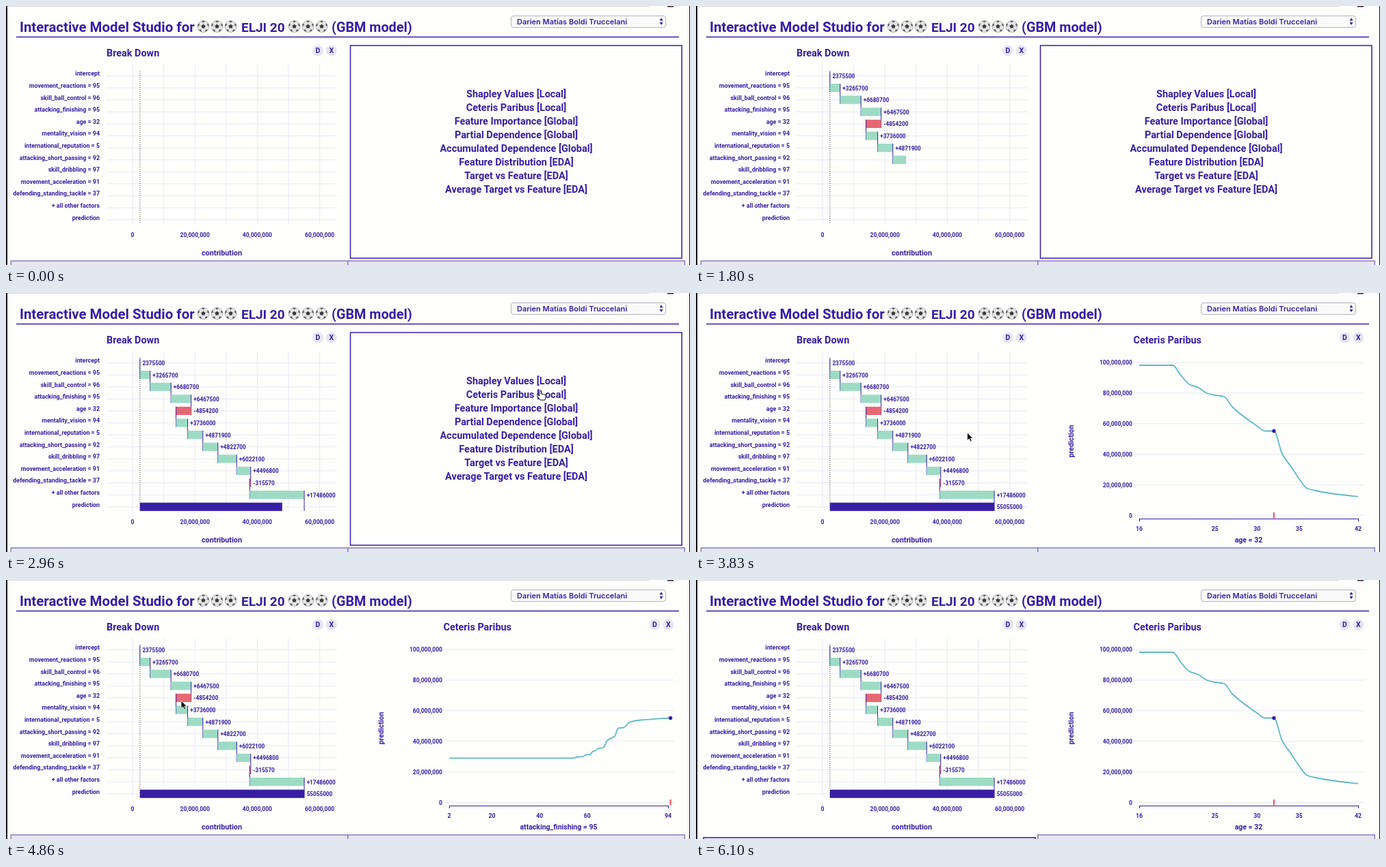
Write an HTML page that moves like this. It is 1000 by 380 pixels and loops after 8000 ms.

```html
<!DOCTYPE html>
<html lang="en">
<head>
<meta charset="utf-8">
<title>Interactive Model Studio</title>
<style>
  html, body { margin: 0; width: 100%; height: 100%; overflow: hidden; background: #fefefd; }
  svg { display: block; width: 1000px; height: 380px; font-family: Roboto, "Noto Sans", sans-serif; font-weight: 700; }
  text { fill: #371ea3; white-space: pre; }
</style>
</head>
<body>
<svg id="stage" viewBox="0 0 1000 380"></svg>
<script>
const LOOP = 8000;
const INK = '#371ea3', GREEN = '#9edbc5', RED = '#e66874', TEAL = '#5fb9c1', GRID = '#e9e9f1';
const BARS_START = 246, BAR_TIME = 232.5, DRAW_TIME = 235;

const stage = document.getElementById('stage');

function el(parent, tag, attrs = {}, content) {
  const node = document.createElementNS('http://www.w3.org/2000/svg', tag);
  set(node, attrs);
  if (content !== undefined) node.textContent = content;
  return parent.appendChild(node);
}
function set(node, attrs) {
  for (const key in attrs) node.setAttribute(key, attrs[key]);
}
const show = (node, on) => node.setAttribute('visibility', on ? 'visible' : 'hidden');
const group = (parent = stage) => el(parent, 'g');
const label = (parent, x, y, size, content, anchor = 'start') =>
  el(parent, 'text', { x, y, 'font-size': size, 'text-anchor': anchor }, content);
const line = (parent, x1, y1, x2, y2, stroke, width = 1) =>
  el(parent, 'line', { x1, y1, x2, y2, stroke, 'stroke-width': width });
const box = (parent, x, y, width, height, fill, more = {}) =>
  el(parent, 'rect', { x, y, width, height, fill, ...more });

const clamp = v => Math.max(0, Math.min(1, v));
const cubicInOut = p => p < 0.5 ? 4 * p ** 3 : 1 - 4 * (1 - p) ** 3;

// Page frame and header
box(stage, 0, 0, 1000, 380, '#fefefd');
box(stage, 0, 0, 940, 1, '#d9d9d9');
box(stage, 967, 0, 9, 1.5, '#3b1f33');
box(stage, 0, 0, 2, 380, '#111');
box(stage, 999, 0, 1, 380, '#111');

function ball(cx, cy) {
  const g = el(stage, 'g', { transform: `translate(${cx} ${cy})` });
  el(g, 'circle', { r: 8.5, fill: '#e6e6e6', stroke: '#9a9a9a', 'stroke-width': 0.7 });
  const ring = r => [0, 1, 2, 3, 4].map(i => {
    const a = i * 72 * Math.PI / 180;
    return [r * Math.sin(a), -r * Math.cos(a)];
  });
  el(g, 'polygon', { points: ring(3.2).join(' '), fill: '#3a3a3a' });
  ring(7.3).forEach(([x, y], i) => {
    line(g, x * 0.45, y * 0.45, x, y, '#aaa', 0.6);
    el(g, 'ellipse', { cx: x, cy: y, rx: 2.1, ry: 1, fill: '#555', transform: `rotate(${i * 72} ${x} ${y})` });
  });
}

label(stage, 20, 37.5, 20.4, 'Interactive Model Studio for');
label(stage, 344, 37.5, 19, 'ELJI 20');
label(stage, 476, 37.5, 19.8, '(GBM model)');
[288.5, 308.5, 328.5, 421.5, 441.5, 461.5].forEach(x => ball(x, 30));
line(stage, 15, 45.5, 984, 45.5, INK, 1.6);

box(stage, 738.5, 14.5, 226, 17, '#fafafa', { rx: 3.5, stroke: '#b4b4b8' });
set(label(stage, 747, 27, 11, 'Darien Matías Boldi Truccelani'),
  { 'font-family': 'Inter, "Liberation Sans", sans-serif', 'font-weight': 600 });
el(stage, 'path', { d: 'M955.5 21.5L958 17.5L960.5 21.5ZM955.5 24L958 28L960.5 24Z', fill: INK });

// Empty panels at the bottom
const panel = x => box(stage, x, 374, 492.5, 12, '#e6e5f0', { stroke: '#8178bd', 'stroke-width': 1.4 });
const leftPanel = panel(7.3);
panel(499.8);
const openPanel = group();
box(openPanel, 5, 372, 494, 8, '#fefefd');
box(openPanel, 11, 378, 485, 10, '#fefefd', { stroke: INK, 'stroke-width': 1.6 });

function heading(parent, x, title, buttonX) {
  label(parent, x, 73.5, 14.4, title);
  [['D', buttonX], ['X', buttonX + 19.7]].forEach(([char, cx]) => {
    el(parent, 'circle', { cx, cy: 65.5, r: 8, fill: '#e6e5f2' });
    label(parent, cx, 69.2, 10.4, char, 'middle');
  });
}

// Break Down chart
const breakDown = group();
const toX = millions => 185 + millions * 4.56;
const rowY = i => 102.5 + i * 17.6;
const rows = [
  ['intercept', 2375500], ['movement_reactions = 95', 3265700], ['skill_ball_control = 96', 6680700],
  ['attacking_finishing = 95', 6467500], ['age = 32', -4854200], ['mentality_vision = 94', 3736000],
  ['international_reputation = 5', 4871900], ['attacking_short_passing = 92', 4822700],
  ['skill_dribbling = 97', 6022100], ['movement_acceleration = 91', 4496800],
  ['defending_standing_tackle = 37', -315570], ['+ all other factors', 17486000], ['prediction', 55055000]
];
heading(breakDown, 147, 'Break Down', 456);
for (let m = 0; m <= 60; m += 10) {
  line(breakDown, toX(m), 86, toX(m), 319, GRID);
  if (m % 20 === 0) label(breakDown, toX(m), 339, 8.5, m ? m + ',000,000' : '0', 'middle');
}
label(breakDown, 315.5, 366, 10.8, 'contribution', 'middle');
rows.forEach(([name], i) => {
  line(breakDown, 147, rowY(i), 484, rowY(i), GRID);
  label(breakDown, 137, rowY(i) - 0.2, 8.9, name, 'end');
});

let total = 0;
const base = toX(2.3755);
const bars = rows.map(([, value], i) => {
  const last = i === rows.length - 1;
  const from = i === 0 || last ? base : toX(total / 1e6);
  if (!last) total += value;
  const to = toX(total / 1e6), y = rowY(i);
  const rect = box(breakDown, from, y - 6.1, 0, 12.2, last ? INK : value < 0 ? RED : GREEN);
  const done = group(breakDown);
  if (!last) line(done, to, y - 6.1, to, y + 23.7, INK);
  const sign = i > 0 && !last && value > 0 ? '+' : '';
  label(done, Math.max(from, to) + 3.6, y + 3.4, 8.2, sign + value);
  return { rect, done, from, to };
});
set(line(breakDown, base, 95, base, 319, '#333'), { 'stroke-dasharray': '1 2' });

function drawBars(t) {
  bars.forEach(({ rect, done, from, to }, i) => {
    const start = BARS_START + (i - 1) * BAR_TIME;
    const x = from + (to - from) * cubicInOut(clamp((t - start) / BAR_TIME));
    set(rect, { x: Math.min(from, x), width: Math.abs(x - from) });
    show(done, i === 0 ? t >= 230 : t >= start + BAR_TIME);
  });
}

// Chart menu
const menu = group();
box(menu, 503.5, 58, 484.5, 312, '#fefefd', { stroke: INK, 'stroke-width': 1.5 });
['Shapley Values [Local]', 'Ceteris Paribus [Local]', 'Feature Importance [Global]',
 'Partial Dependence [Global]', 'Accumulated Dependence [Global]', 'Feature Distribution [EDA]',
 'Target vs Feature [EDA]', 'Average Target vs Feature [EDA]'
].forEach((item, i) => label(menu, 746, 133.6 + i * 20, 14.45, item, 'middle'));

// Ceteris Paribus chart
const ceteris = group();
heading(ceteris, 639.5, 'Ceteris Paribus', 948.5);
for (let i = 0; i <= 5; i++) {
  const y = 326.5 - i * 44.9;
  line(ceteris, 640, y, 977, y, GRID);
  label(ceteris, 638, y + 3, 8.5, i ? i * 20 + ',000,000' : '0', 'end');
}
el(ceteris, 'path', { d: 'M648.5 335V331.5H968.5V335', fill: 'none', stroke: INK, 'stroke-width': 1.2 });
set(label(ceteris, 0, 0, 10.5, 'prediction', 'middle'), { transform: 'translate(552 217.5) rotate(-90)' });

// Smooth path that never overshoots its points
function monotone(p) {
  const slope = p.slice(1).map(([x, y], i) => (y - p[i][1]) / (x - p[i][0]));
  const tangent = p.map((_, i) => {
    const a = slope[i - 1], b = slope[i];
    if (a === undefined || b === undefined) return a ?? b;
    return a * b <= 0 ? 0 : 2 * a * b / (a + b);
  });
  return p.slice(1).reduce((d, [x, y], i) => {
    const [px, py] = p[i], h = (x - px) / 3;
    return d + `C${px + h} ${py + h * tangent[i]} ${x - h} ${y - h * tangent[i + 1]} ${x} ${y}`;
  }, 'M' + p[0]);
}

function profile(caption, low, high, ticks, current, points) {
  const g = group(ceteris);
  const x = v => 648 + (v - low) / (high - low) * 320;
  ticks.forEach(v => label(g, x(v), 348.5, 8.7, v, 'middle'));
  label(g, 808, 366, 10.5, caption, 'middle');
  const curve = el(g, 'path', {
    d: monotone(points), fill: 'none', stroke: TEAL, 'stroke-width': 1.8, pathLength: 1, 'stroke-dasharray': '1 2'
  });
  const marks = group(g);
  line(marks, x(current), 322, x(current), 330.5, '#ef4d58', 2);
  el(marks, 'circle', { cx: x(current), cy: 202.5, r: 2.7, fill: INK });
  return (on, elapsed) => {
    g.setAttribute('display', on ? 'inline' : 'none');
    const p = clamp(elapsed / DRAW_TIME);
    set(curve, { 'stroke-dashoffset': 1 - p, opacity: p > 0 ? 1 : 0 });
    marks.setAttribute('opacity', clamp((elapsed - DRAW_TIME) / 60));
  };
}

const ageProfile = profile('age = 32', 16, 42, [16, 25, 30, 35, 42], 32, [
  [648, 106], [697, 106], [709, 121], [722, 134.5], [734, 138.5], [747, 147], [759, 150], [772, 152],
  [784, 167], [796, 177.5], [820, 195], [832, 202.5], [845, 202.5], [857, 236], [870, 255],
  [882, 273], [893, 286.5], [906, 290], [919, 292.5], [943, 296], [968, 298.7]
]);
const finishingProfile = profile('attacking_finishing = 95', 2, 94, [2, 20, 40, 60, 94], 95, [
  [648, 261.3], [829, 261.3], [836, 259.5], [843, 259.3], [848, 256.5], [854, 256], [858, 251.5],
  [862, 250.5], [866, 247], [873, 246], [879, 235.5], [890, 229], [895, 217.5], [903, 216.5],
  [912, 208.5], [928, 205.5], [950, 203.7], [971, 202.5]
]);

// Tooltips
function tooltip(x, y, width, lines) {
  const g = group();
  box(g, x - width / 2, y, width, 51, '#000', { opacity: 0.82, rx: 1.5 });
  lines.forEach((content, i) => set(label(g, x, y + 15 + i * 12, 10, content, 'middle'),
    { style: 'fill:#fff', 'font-weight': 500 }));
  el(g, 'path', { d: `M${x - 5} ${y + 41}h10l-5 9.5z`, fill: '#fff' });
  return g;
}
const finishingTip = tooltip(258.5, 100, 129, ['attacking_finishing = 95', 'increases average response', 'by 6467500']);
const ageTip = tooltip(257, 119, 135, ['age = 32', 'decreases average response', 'by 4854200']);

// Pointer
const arrow = el(stage, 'path', {
  d: 'M0 0V11.5L2.7 9L4.6 13L6.7 12.2L4.9 8.2H8.5Z', fill: '#111', stroke: '#fff', 'stroke-width': 0.8
});
const hand = el(stage, 'path', {
  d: 'M-1 0C0-1 1.3-.5 1.4.6V4L7 5.2C8.5 5.6 8.4 7 8 9L7 13H0L-4 7.8C-5 6-3-.2-3 6L-1.2 7.3Z',
  fill: '#fff', stroke: '#111', 'stroke-width': 1
});
const route = [
  [2350, 890, -16], [2700, 905, 102], [2940, 781, 144], [3360, 781, 144], [3830, 397, 205],
  [4130, 259, 173], [4160, 259, 172], [4200, 258, 153], [4560, 258, 153], [4840, 256, 177],
  [5080, 256, 177], [5100, 255.5, 174.5], [5460, 255.5, 174.5], [5860, 232, 384]
];
function pointerAt(t) {
  const next = route.findIndex(([time]) => time > t);
  if (next < 1) return [0, -50];
  const [t0, x0, y0] = route[next - 1], [t1, x1, y1] = route[next];
  const p = clamp((t - t0) / (t1 - t0)), k = p * p * (3 - 2 * p);
  const ease = t > 3360 && t < 4130 ? p : k;
  return [x0 + (x1 - x0) * ease, y0 + (y1 - y0) * ease];
}

function render(t) {
  drawBars(t);
  menu.setAttribute('display', t < 3360 ? 'inline' : 'none');
  ceteris.setAttribute('display', t < 3360 ? 'none' : 'inline');
  const finishing = t >= 4560 && t < 5460;
  ageProfile(!finishing, t - (t < 4560 ? 3360 : 5460));
  finishingProfile(finishing, t - 4560);

  show(finishingTip, t >= 4200 && t < 4640);
  show(ageTip, (t >= 4130 && t < 4200) || (t >= 4720 && t < 4830));

  const [x, y] = pointerAt(t);
  const overMenu = t < 3360 && x < 819 && y > 120;
  [[arrow, !overMenu], [hand, overMenu]].forEach(([node, on]) => {
    set(node, { transform: `translate(${x} ${y})` });
    show(node, on);
  });

  leftPanel.setAttribute('fill', t >= 5800 && t < 6100 ? '#d6d3ea' : '#e6e5f0');
  show(openPanel, t >= 6100);
}

const begin = performance.now();
function tick() {
  render((performance.now() - begin) % LOOP);
  requestAnimationFrame(tick);
}
tick();
</script>
</body>
</html>
```
